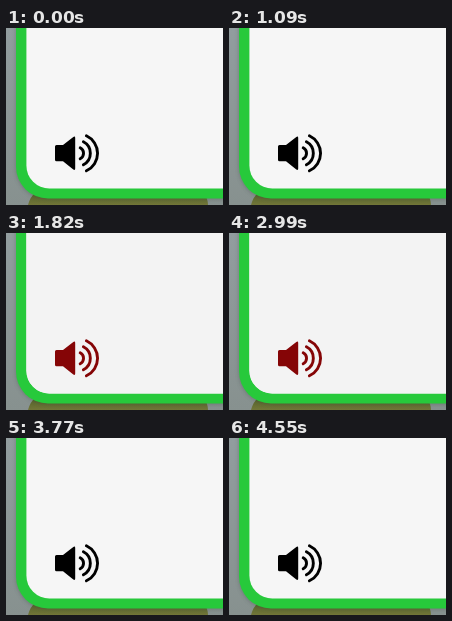
An HTML page that plays this animation: 217 px wide and 177 px high, repeating every 5070 ms.

```html
<!DOCTYPE html>
<html lang="en">
<head>
<meta charset="utf-8">
<title>Speaker</title>
<style>
  html, body { margin: 0; width: 100%; height: 100%; overflow: hidden; background: #89949a; }
  svg { display: block; width: 217px; height: 177px; }
  .active { animation: toggle 5070ms step-end infinite; }
  /* active from 1820 ms to 3770 ms */
  @keyframes toggle {
    0% { opacity: 0; }
    35.8974% { opacity: 1; }
    74.3589% { opacity: 0; }
  }
</style>
</head>
<body>
<svg viewBox="0 0 217 177">
  <defs>
    <linearGradient id="wall" x2="0" y2="1">
      <stop offset="0" stop-color="#929d9f"/>
      <stop offset="1" stop-color="#87918f"/>
    </linearGradient>
    <linearGradient id="olive" x2="0" y2="1">
      <stop offset="0" stop-color="#53622c"/>
      <stop offset="1" stop-color="#727638"/>
    </linearGradient>
    <filter id="shade" x="-20%" y="-20%" width="140%" height="140%">
      <feGaussianBlur stdDeviation="2"/>
    </filter>
    <filter id="soft" x="-10%" y="-10%" width="120%" height="120%" color-interpolation-filters="sRGB">
      <feGaussianBlur stdDeviation=".45"/>
    </filter>
    <g id="speaker" filter="url(#soft)">
      <path stroke="none" d="M50.500 117H57L67.300 109Q69.200 107.800 69.200 110V140.500Q69.200 142.700 67.300 141.500L57 133.300H50.500Q49 133.300 49 131.800V118.500Q49 117 50.500 117Z"/>
      <path fill="none" stroke-width="2.900" stroke-linecap="round" d="M74.200 119.800A6.200 6.200 0 0 1 74.200 130.800M77.400 113.800A13 13 0 0 1 77.400 136.800M80.400 107.800A19.300 19.300 0 0 1 80.400 142.800"/>
    </g>
  </defs>

  <rect width="217" height="177" fill="url(#wall)"/>
  <path fill="url(#olive)" d="M29 165H198Q202 171 202 177H22Q24 169 29 165Z"/>
  <rect x="10" y="-60" width="260" height="231" rx="32" fill="#34413c" opacity=".35" filter="url(#shade)"/>
  <g filter="url(#soft)">
    <rect x="10" y="-60" width="260" height="230.500" rx="32" fill="#27c93b"/>
    <rect x="20.400" y="-60" width="250" height="220.600" rx="23" fill="#f6f6f6"/>
  </g>
  <g fill="#000" stroke="#000"><use href="#speaker"/></g>

  <g class="active">
    <rect x="20.400" y="-60" width="250" height="220.600" rx="23" fill="#f3f3f3" filter="url(#soft)"/>
    <g fill="#850506" stroke="#850506"><use href="#speaker"/></g>
  </g>
</svg>
</body>
</html>
```
